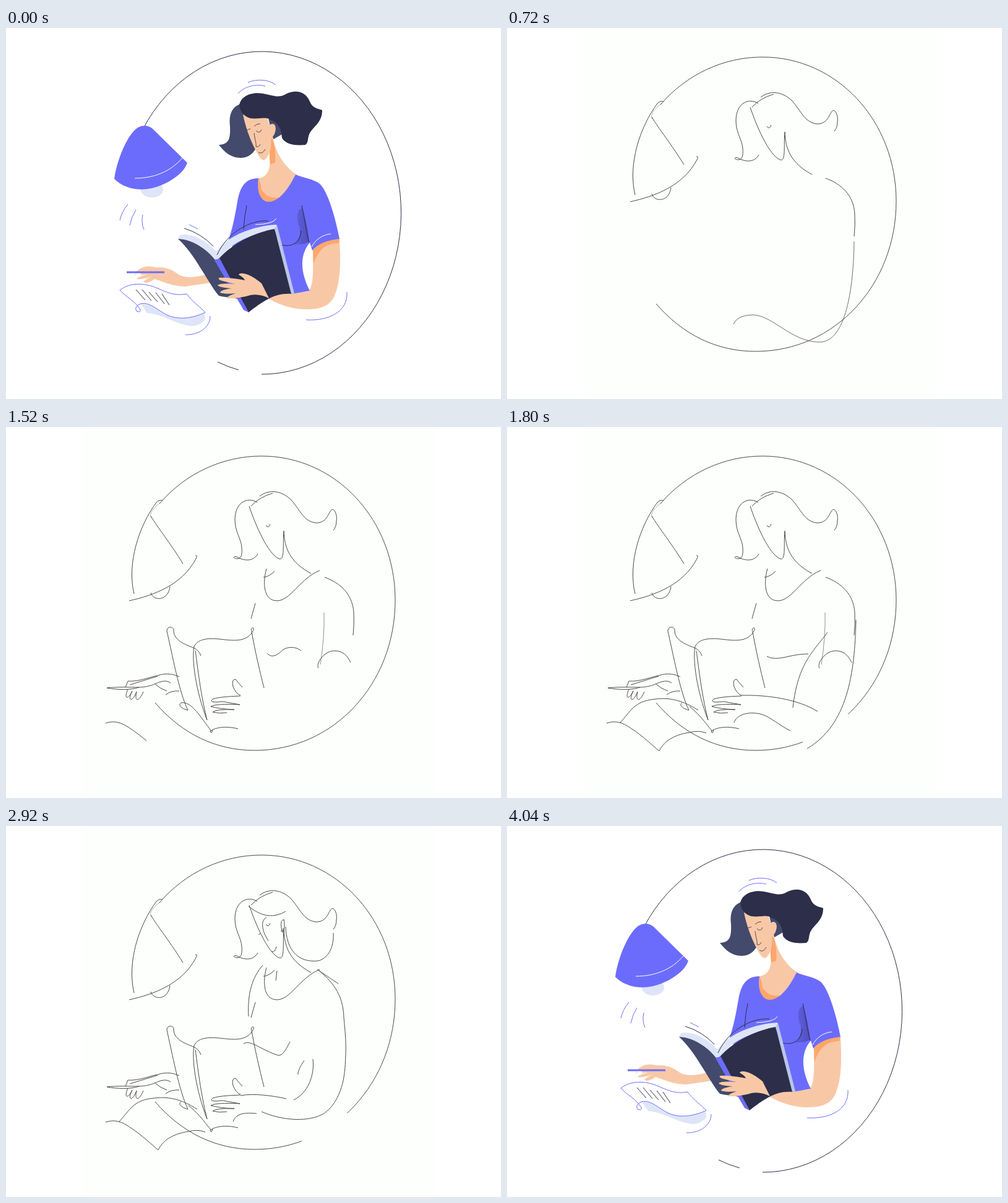
These frames come from a looping animation (800x600 px, 7 s). An HTML page:

```html
<!DOCTYPE html>
<html lang="en">
<head>
<meta charset="utf-8">
<title>Reader by lamplight</title>
<style>
html, body { margin: 0; height: 100%; overflow: hidden; background: #fff; }
svg { display: block; width: 100vw; height: 100vh; }
#sketch rect { fill: #fdfffc; }
#sketch path { fill: none; stroke: #4a4a4a; stroke-width: 1; stroke-dasharray: 1 2; }
#sketch .eraser { stroke: #fdfffc; stroke-width: 8; }
.blue { fill: #6c6cfc; }
.slate { fill: #434a6b; }
.dark { fill: #2c2e4a; }
.skin { fill: #f8c8a6; }
.shade { fill: #ffa66c; }
.pale { fill: #dee5f8; }
.ink, .accent, .chalk, .pen { fill: none; stroke: #2c2e4a; stroke-width: 1; }
.accent { stroke: #6c6cfc; }
.chalk { stroke: #fff; }
.pen { stroke: #6c6cfc; stroke-width: 3; }
</style>
</head>
<body>
<svg viewBox="0 0 800 600">
  <defs>
    <linearGradient id="fold">
      <stop offset="0" stop-color="#6262ea"/>
      <stop offset="1" stop-color="#4f4fb8"/>
    </linearGradient>
  </defs>

  <g id="art">
    <!-- ring and lamp -->
    <path class="ink" d="M221 164A225 261 0 1 1 413 560M342 540Q358 548 376 553"/>
    <ellipse class="pale" cx="236" cy="261" rx="18" ry="13"/>
    <path class="blue" d="M175 244C179 214 196 172 213 161Q226 154 237 163L293 218C289 229 281 237 270 244C238 266 198 267 175 244Z"/>
    <path class="chalk" d="M208 243C238 243 266 233 286 209"/>
    <path class="accent" d="M197 285Q187 297 184 311M210 294Q203 305 200 319M221 302Q218 315 223 326M375 106C385 94 405 90 419 94M391 88C405 82 425 83 436 92"/>

    <!-- head -->
    <path class="slate" d="M382 122C365 126 360 140 362 158C363 180 360 188 344 189C350 196 360 210 380 210C397 209 404 198 410 180ZM424 146Q440 146 446 172L432 180Z"/>
    <path class="skin" d="M431 176C436 202 450 225 470 237C455 265 440 281 425 281C410 281 405 262 408 243C423 241 428 228 427 205L427 178Z"/>
    <path class="shade" d="M430 178Q437 196 435 218L427 221Q424 200 428 182ZM408 243C405 264 410 281 425 281Q436 281 443 274C420 276 419 267 413 262Q411 248 408 243Z"/>
    <path class="skin" d="M383 140L422 145L426 157C433 151 438 159 435 168C433 176 428 178 428 180C430 195 424 210 417 214C411 213 407 204 402 195C394 179 387 160 383 140Z"/>
    <path class="dark" d="M377 125C380 108 400 103 415 106C432 109 440 114 452 107C470 98 485 104 491 119C496 131 505 130 511 133C511 151 500 157 492 168C486 178 490 184 484 189C470 190 454 190 446 178C445 162 439 152 428 149C420 142 410 148 395 146Q380 142 377 125Z"/>
    <path class="ink" stroke-opacity=".8" d="M389 165L395 163M401 159Q406 154 411 155M404 166Q410 172 413 164M401 170C402 180 405 187 404 192Q409 193 411 188M408 201Q414 205 419 196"/>

    <!-- shirt and arm -->
    <path class="skin" d="M496 358L539 341C541 380 541 410 530 435C520 455 495 457 470 454C450 451 430 442 414 432L411 413C440 424 465 430 489 426C498 414 496 390 496 358Z"/>
    <path class="shade" d="M496 360C502 348 520 338 539 341L537 348C518 348 505 358 497 381Z"/>
    <path class="blue" d="M408 243C386 243 379 258 375 275C370 305 366 325 358 348L375 360L462 430L491 425C478 400 472 370 491 347L495 360C505 348 520 343 539 341C532 305 520 264 507 252C497 244 482 243 468 237C455 263 440 281 425 281C410 281 405 262 408 243Z"/>
    <path fill="url(#fold)" d="M479 291C469 294 469 308 474 322Q478 340 464 350Q484 351 490 345Q486 312 479 291Z"/>
    <path class="ink" d="M478 287C483 310 485 328 490 347M443 350C460 356 476 348 477 328M389 287Q385 305 384 326"/>
    <path class="chalk" d="M494 354C500 342 512 334 525 333"/>

    <!-- writing hand -->
    <path class="skin" d="M328 397C305 405 286 405 275 396Q265 388 250 387C240 388 233 384 225 386Q210 390 209 400L228 399Q213 402 211 406Q220 407 236 402Q225 406 222 411Q229 414 240 406C255 410 265 417 290 418L331 412Z"/>
    <ellipse cx="214" cy="398" rx="4" ry="3" fill="#fff"/>
    <path class="pen" d="M195 395H256"/>

    <!-- book -->
    <path class="slate" d="M278 341C300 340 325 358 338 374L380 442C372 434 358 437 344 433C325 410 305 365 278 341Z"/>
    <path class="pale" d="M281 335Q306 329 340 361C360 335 400 320 437 318L440 330C400 330 365 345 346 373L337 374C325 358 300 341 278 341Z"/>
    <path fill="#b9c6e6" d="M434 324L438 319L466 429L460 431Z"/>
    <path class="dark" d="M344 373C370 345 405 330 434 325L461 430C435 428 415 442 392 460Z"/>
    <path class="blue" d="M336 374Q341 375 345 372L392 460L384 456Z"/>
    <path class="ink" d="M341 367C358 330 395 310 424 312M288 324Q315 332 335 353"/>
    <path class="accent" d="M296 318L310 325"/>
    <path class="chalk" d="M403 318Q432 317 437 308"/>
    <path class="skin" d="M413 413C402 404 395 400 388 398Q378 395 376 399Q385 404 386 408C370 405 355 403 344 404Q342 407 350 409L370 414C355 413 345 413 342 416Q345 420 365 421C350 423 346 426 346 428Q355 431 372 429Q358 433 357 437C370 438 385 435 395 432C405 430 415 432 425 437Z"/>

    <!-- paper -->
    <path class="pale" d="M218 446C240 444 270 469 320 459Q323 472 322 472Q312 482 300 482C270 478 255 463 228 461Z"/>
    <path class="accent" style="fill:#fff" d="M184 424C200 411 225 412 245 421C265 430 275 433 292 430C300 442 315 452 322 460C300 470 280 472 262 465C245 457 230 440 215 447Q207 452 211 458Q218 461 217 455C207 440 195 436 184 424Z"/>
    <path class="ink" d="M210 423L225 440M220 423L235 441M231 427L245 443M242 428L256 446M252 430L264 448"/>
    <path class="accent" d="M290 496C310 497 330 485 330 466M485 472C520 474 553 460 551 427"/>
  </g>

  <g id="sketch"><rect x="125" width="568" height="600"/></g>
</svg>
<script>
const LOOP = 7000, STEP = 40, SKETCH_FROM = 40, SKETCH_TO = 4040;

// [start, draw time, path, removal time, opacity]
const strokes = [
  // ring and lamp
  [20, 140, 'M241 446C285 497 340 523 402 523C530 523 629 415 629 280C629 150 533 47 413 47C350 47 290 75 248 124'],
  [120, 80, 'M253 119Q248 117 243 122C215 160 195 220 207 270'],
  [160, 60, 'M250 122Q229 138 235 147', undefined, .4],
  [180, 50, 'M234 144C246 164 265 187 286 221'],
  [180, 60, 'M199 281C240 272 285 255 307 213Q310 207 306 208'],
  [210, 40, 'M234 268C238 282 262 282 265 258'],
  // first pass over head and arm
  [230, 80, 'M410 112C425 100 445 103 460 117C475 133 480 152 500 155C517 156 520 142 525 135C530 129 536 142 534 152Q534 161 529 167'],
  [240, 40, 'M396 128Q408 114 431 107'],
  [270, 50, 'M397 145C408 175 437 210 446 212Q451 211 446 180', 400, .8],
  [360, 80, 'M393 128C403 158 423 205 441 213C451 217 447 192 449 168'],
  [420, 100, 'M406 122C390 112 370 122 370 150C370 170 380 180 381 195C382 207 380 213 374 213C366 213 367 208 373 210C385 217 400 218 407 205'],
  [500, 40, 'M420 159Q424 165 427 157'],
  [520, 60, 'M449 168C450 195 458 218 493 237'],
  [580, 60, 'M515 243C540 252 560 270 562 300Q563 318 561 337', 2640],
  [620, 100, 'M561 345C560 420 548 508 505 508C460 508 430 465 398 464C380 464 370 470 366 479', 1480, .8],
  // neckline, book and holding hand
  [740, 60, 'M421 229C415 250 415 281 438 281C460 281 475 245 507 232M416 243Q426 242 434 233'],
  [780, 40, 'M403 285L396 310'],
  [800, 80, 'M294 458C280 430 268 365 260 330C260 322 270 322 271 328'],
  [840, 40, 'M271 328C270 345 290 352 303 357Q312 361 315 370', 2960],
  [860, 80, 'M304 355C310 343 325 341 345 343C365 345 390 350 400 328C402 322 394 325 397 331C402 360 410 395 417 422'],
  [900, 60, 'M304 355C300 375 306 425 325 474M306 362C310 390 314 430 325 474', 2960],
  [940, 60, 'M294 458C285 456 277 450 283 446'],
  [960, 40, 'M283 446C300 443 315 470 332 492', 1560],
  [980, 40, 'M375 488C350 482 335 488 330 492Q332 498 334 490'],
  [1000, 100, 'M382 421Q374 412 371 408Q364 408 367 420Q372 432 379 434M379 435Q345 436 334 440Q326 447 350 444L378 449Q340 447 331 452Q345 456 369 457Q340 456 334 461Q345 464 357 462'],
  [1060, 50, 'M505 390C500 382 515 362 530 362C545 361 553 372 557 381', 2640],
  [1060, 40, 'M514 300Q515 340 508 384', 2640, .6],
  [1080, 40, 'M422 366C430 375 440 368 448 360C458 354 470 356 477 362', 1600],
  // writing hand
  [1180, 60, 'M163 422C180 420 200 421 215 421C200 426 180 425 163 422'],
  [1220, 80, 'M193 421L197 411C215 412 230 405 245 402C260 397 272 400 280 404M200 417L245 403'],
  [1300, 80, 'M197 424C190 440 197 442 204 427C195 445 205 445 211 428C207 445 215 445 222 428'],
  [1360, 80, 'M215 421C235 420 240 415 250 412Q260 409 266 414M240 415Q250 424 260 427M258 433Q267 426 280 427'],
  // paper and forearm
  [1480, 100, 'M161 479C175 474 187 478 200 487C220 500 235 515 246 524C255 505 275 497 295 494Q310 490 322 495'],
  [1540, 60, 'M183 478C200 460 205 443 240 440C265 437 285 443 309 458'],
  [1580, 40, 'M295 452C315 468 325 485 332 492', 2960],
  [1600, 50, 'M379 434C420 433 470 440 502 460', 2800],
  [1620, 60, 'M367 478C372 462 400 458 420 468C440 480 450 488 458 491', 2800],
  [1660, 60, 'M564 312C562 400 550 482 485 520', 2720],
  [1700, 60, 'M518 332C498 360 470 380 462 454', 2400],
  [1740, 60, 'M420 371C440 380 455 367 487 367', 2440],
  // face, hair and shirt
  [1900, 80, 'M421 148C412 152 414 165 418 175L424 186M408 176L412 173'],
  [1980, 60, 'M429 203Q435 205 437 195'],
  [2040, 100, 'M449 152C443 150 444 165 447 172C450 170 451 160 449 151M444 169Q448 172 448 165'],
  [2200, 60, 'M392 130C405 140 420 148 437 144Q446 142 452 138'],
  [2260, 100, 'M452 163C453 198 470 222 505 218C522 213 530 195 529 173'],
  [2360, 60, 'M415 225C398 245 390 270 392 308M438 234L436 250'],
  [2400, 60, 'M522 317C510 345 468 390 466 445', 2760],
  [2460, 80, 'M384 352C395 345 412 362 440 371C448 371 452 362 459 349'],
  // corrected sleeve, arm and spine
  [2640, 100, 'M505 233C525 250 545 270 546 310C551 360 549 365 548 390C545 430 530 455 512 466C490 478 450 478 413 462'],
  [2720, 40, 'M503 232L537 255'],
  [2760, 60, 'M496 377C499 403 488 432 465 443'],
  [2800, 60, 'M379 436C400 432 430 436 453 441M367 478C372 465 385 463 405 465'],
  [2900, 100, 'M472 402C470 390 505 340 540 342Q556 343 564 357'],
  [2960, 80, 'M487 300Q491 330 488 357M551 327L543 367'],
  [3000, 120, 'M271 328C270 345 285 350 292 352Q287 347 290 346L304 349'],
  [3080, 160, 'M291 349L327 487M303 345L331 490']
];

const art = document.getElementById('art');
const sketch = document.getElementById('sketch');

function addStroke([start, span, d, end = SKETCH_TO, opacity = 1], className = '') {
  const path = document.createElementNS('http://www.w3.org/2000/svg', 'path');
  path.setAttribute('d', d);
  path.setAttribute('pathLength', 1);
  path.setAttribute('class', className);
  path.style.opacity = opacity;
  sketch.append(path);
  return { path, start, span, end };
}

const [ring, ...rest] = strokes;
const lines = [
  addStroke(ring),
  addStroke([1600, 80, 'M478 510Q521 494 551 464'], 'eraser'),
  ...rest.map(stroke => addStroke(stroke))
];

function render(now) {
  const t = Math.floor(now % LOOP / STEP) * STEP;
  const drawing = t >= SKETCH_FROM && t < SKETCH_TO;
  art.style.display = drawing ? 'none' : '';
  sketch.style.display = drawing ? '' : 'none';
  for (const { path, start, span, end } of lines) {
    path.style.display = t > start && t < end ? '' : 'none';
    path.style.strokeDashoffset = 1 - Math.min(1, Math.max(0, (t - start) / span));
  }
  requestAnimationFrame(() => render(performance.now()));
}
render(0);
</script>
</body>
</html>
```
